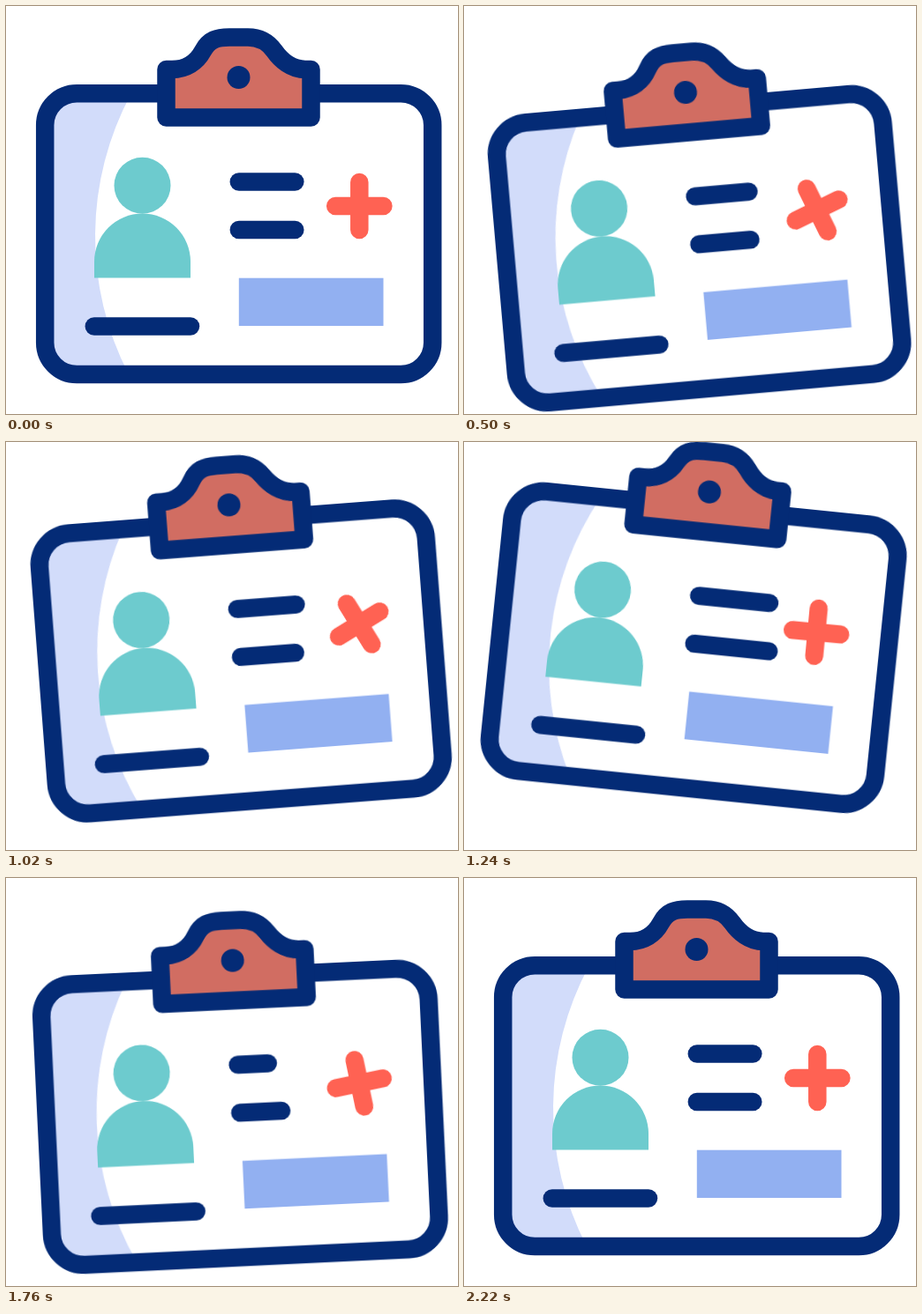
Write an HTML page without scripts that moves like this. It is 512 by 463 pixels and loops after 2.4 s.

```html
<!DOCTYPE html>
<html lang="en">
<head>
<meta charset="utf-8">
<title>Clipboard wobble</title>
<style>
  html, body { margin: 0; width: 100%; height: 100%; overflow: hidden; background: #fff; }
  svg { display: block; width: 100vw; height: 100vh; }

  .ink { fill: none; stroke: #042b76; stroke-width: 20.5; stroke-linecap: round; stroke-linejoin: round; }
  .plus { fill: none; stroke: #ff6253; stroke-width: 20.5; stroke-linecap: round; }

  /* sine in-out between the poses, rest at both ends of the loop */
  .lift, .tilt, .plus, .bar { animation: 2400ms cubic-bezier(.37, 0, .63, 1) infinite; }
  .lift { animation-name: lift; }
  .tilt { animation-name: tilt; transform-origin: 256px 224px; }
  .plus { animation-name: spin; transform-origin: 400.3px 227px; }
  .bar { stroke-dasharray: 63.5 200; }
  .one { animation-name: one; }
  .two { animation-name: two; }

  @keyframes lift {
    0%, 8.333%, 91.667%, 100% { transform: translateY(0); }
    29.167% { transform: translateY(26px); }
    50.833% { transform: translateY(-26px); }
    71.667% { transform: translateY(13px); }
  }
  @keyframes tilt {
    0%, 8.333%, 91.667%, 100% { transform: rotate(0deg); }
    33.333% { transform: rotate(-10deg); }
    58.333% { transform: rotate(8.9deg); }
    75% { transform: rotate(-3deg); }
  }
  @keyframes spin {
    0%, 8.333%, 91.667%, 100% { transform: rotate(0deg); }
    33.333% { transform: rotate(-42deg); }
    58.333% { transform: rotate(7.5deg); }
    75% { transform: rotate(-9.5deg); }
  }
  @keyframes one {
    0%, 16.667%, 91.667%, 100% { stroke-dasharray: 63.5 200; }
    33.333% { stroke-dasharray: 46.9 200; }
    50% { stroke-dasharray: 80.8 200; }
    72.5% { stroke-dasharray: 34 200; }
  }
  @keyframes two {
    0%, 16.667%, 91.667%, 100% { stroke-dasharray: 63.5 200; }
    33.333% { stroke-dasharray: 28.6 200; }
    50% { stroke-dasharray: 85.5 200; }
    72.5% { stroke-dasharray: 46.8 200; }
  }
</style>
</head>
<body>
<svg viewBox="0 0 512 463" preserveAspectRatio="none">
  <g class="lift">
    <g class="tilt">
      <!-- card -->
      <path fill="#d2dcfa" d="M142 99A342 342 0 0 0 139 418H80A36 36 0 0 1 44 382V135A36 36 0 0 1 80 99Z"/>
      <rect class="ink" x="44.2" y="99.3" width="439" height="318.7" rx="36"/>

      <!-- clip -->
      <path class="ink" style="fill:#d16d62" d="M181.5 126.5V72H188C204 72 216 64 223 51S239 35.5 253 35.5H274C288 35.5 297 41 304 51S323 72 339 72H345.5V126.5Z"/>
      <circle cx="263.5" cy="81" r="13" fill="#042b76"/>

      <!-- person -->
      <g fill="#6dcbce">
        <circle cx="154.5" cy="203.7" r="32"/>
        <path d="M100 308.5V290A54.5 54.5 0 0 1 209 290V308.5Z"/>
      </g>

      <!-- details -->
      <path class="ink" d="M99.8 363.5H209"/>
      <path class="ink bar one" d="M263.8 199.5H363.8"/>
      <path class="ink bar two" d="M263.8 254H363.8"/>
      <rect x="263.8" y="308.7" width="163.7" height="54.3" fill="#92b0f1"/>
      <path class="plus" d="M373.2 227H427.4M400.3 199.9V254.1"/>
    </g>
  </g>
</svg>
</body>
</html>
```
